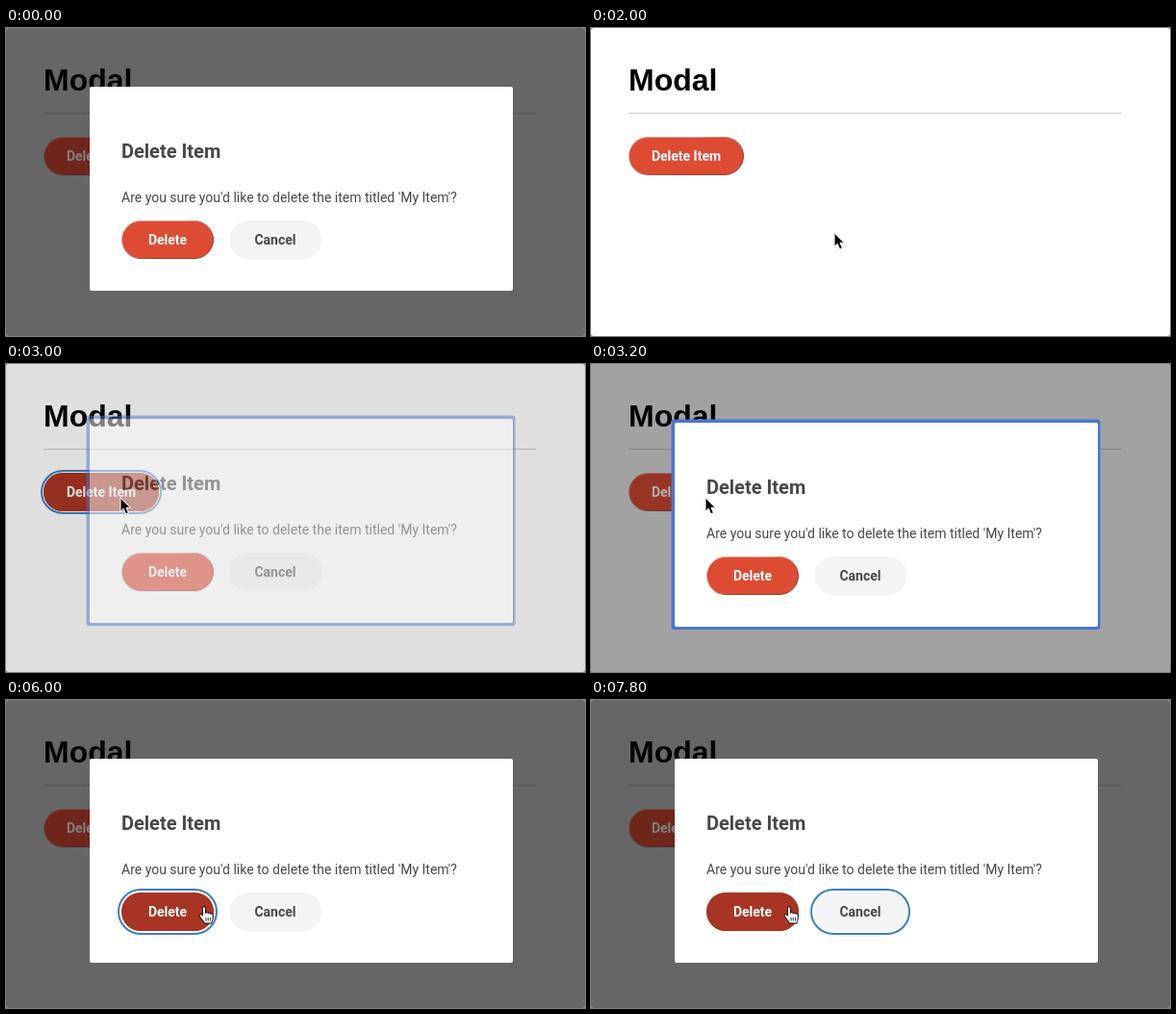
Write an HTML page that moves like this. It is 602 px wide and 320 px high and loops after 8000 ms.

```html
<!DOCTYPE html>
<html lang="en">
<head>
<meta charset="utf-8">
<title>Modal</title>
<style>
html, body { margin: 0; width: 602px; height: 320px; overflow: hidden; background: #888; }
svg { display: block; background: #fff; border-radius: 3px; }
text { font-family: Roboto, sans-serif; font-size: 14px; fill: #474747; }
.heading { font: bold 32px "Liberation Sans", Arial, sans-serif; fill: #000; }
.title { font-size: 20px; font-weight: 700; }
.label { font-weight: 700; text-anchor: middle; }
.light { fill: #fff; }
.red { fill: #dd4b33; stroke: url(#edge); }
.dark { fill: #a83423; }
.ring { fill: #fff; stroke: #3d7fc4; stroke-width: 2; }
#panel { fill: #fff; }
#panelRing { fill: #4a76cc; filter: blur(.4px); }

/* Hard switches */
.flip { animation: 8s step-end infinite; }
#itemRing { animation-name: itemRing; }
#itemHover { animation-name: itemHover; }
#panelRing { animation-name: panelRing; }
#deleteRing { animation-name: deleteRing; }
#deleteHover { animation-name: deleteHover; }
#cancelRing { animation-name: cancelRing; }
#cancelHover { animation-name: cancelHover; }
#press { animation-name: press; }
#hand { animation-name: hand; }
#arrow { animation-name: arrow; }
#pointer { animation-name: pointer; }

/* Smooth motion */
#shade { animation: shade 8s linear infinite; }
#item { animation: dim 8s linear infinite; }
#modal { animation: modal 8s linear infinite; }
#cursor { animation: travel 8s ease-in-out infinite; }

@keyframes itemRing { 0%, 20%, 40% { opacity: 0 } 16.25%, 33.75% { opacity: 1 } 100% { opacity: 0 } }
@keyframes itemHover { 0%, 38.75%, 100% { opacity: 0 } 29.2% { opacity: 1 } }
@keyframes panelRing { 0%, 65%, 100% { opacity: 0 } 35% { opacity: 1 } }
@keyframes deleteRing { 0%, 86.25%, 100% { opacity: 0 } 65% { opacity: 1 } }
@keyframes deleteHover { 0% { opacity: 0 } 65%, 100% { opacity: 1 } }
@keyframes cancelRing { 0%, 16.25% { opacity: 0 } 12.5%, 86.25%, 100% { opacity: 1 } }
@keyframes cancelHover { 0%, 16.25%, 100% { opacity: 0 } 8.75% { opacity: 1 } }
@keyframes press { 0%, 15%, 21.25%, 35%, 100% { opacity: 0 } 12.5%, 18.75%, 33.75% { opacity: 1 } }
@keyframes hand { 0%, 16.25%, 37%, 100% { opacity: 0 } 8.75%, 29.2%, 65% { opacity: 1 } }
@keyframes arrow { 0%, 16.25%, 37%, 100% { opacity: 1 } 8.75%, 29.2%, 65% { opacity: 0 } }
@keyframes pointer { 0% { opacity: 0 } 2.5%, 100% { opacity: 1 } }

@keyframes shade {
  0%, 14% { opacity: .6 }
  16.25%, 35% { opacity: 0 }
  37.5% { opacity: .125 }
  42.5%, 100% { opacity: .6 }
}
@keyframes dim {
  0%, 14% { filter: brightness(.5) }
  16.25%, 35% { filter: brightness(1) }
  37.5% { filter: brightness(.88) }
  42.5%, 100% { filter: brightness(.5) }
}
@keyframes modal {
  0%, 14% { opacity: 1; transform: none }
  16.25% { opacity: 0; transform: translateY(-8px) }
  35% { opacity: 0; transform: translateY(-8px) }
  37.5% { opacity: 1; opacity: .5; transform: translateY(-4px) }
  40%, 100% { opacity: 1; transform: none }
}
@keyframes travel {
  0%, 2.5% { transform: translate(345px, 266px) }
  10%, 23.75% { transform: translate(276px, 223px) }
  25% { transform: translate(253px, 213px) }
  31.25%, 48.75% { transform: translate(119px, 139px) }
  56.25%, 60% { transform: translate(173px, 57px) }
  67.5%, 100% { transform: translate(206px, 215px) }
}
</style>
</head>
<body>
<svg width="602" height="320" viewBox="0 0 602 320">
  <defs>
    <linearGradient id="edge" x2="1" y2="1">
      <stop offset=".3" stop-color="#e4a094"/>
      <stop offset=".7" stop-color="#85443a"/>
    </linearGradient>
  </defs>

  <text class="heading" x="39" y="65">Modal</text>
  <rect x="39" y="88" width="512" height="1" fill="#ccc"/>
  <rect id="shade" width="602" height="320"/>

  <g id="item">
    <rect id="itemRing" class="ring flip" x="37" y="111" width="124" height="44" rx="22"/>
    <rect class="red" x="39.5" y="113.5" width="119" height="39" rx="19.5"/>
    <rect id="itemHover" class="dark flip" x="39" y="113" width="120" height="40" rx="20"/>
    <text class="label light" x="99" y="138">Delete Item</text>
  </g>

  <g id="modal">
    <rect id="panelRing" class="flip" x="83.5" y="57.5" width="446" height="218.5" rx="3"/>
    <rect id="panel" x="87" y="61" width="440" height="212" rx="2"/>
    <text class="title" x="120" y="135">Delete Item</text>
    <text x="120" y="181">Are you sure you'd like to delete the item titled 'My Item'?</text>

    <rect id="deleteRing" class="ring flip" x="117" y="197" width="102" height="46" rx="23"/>
    <rect class="red" x="120.5" y="200.5" width="95" height="39" rx="19.5"/>
    <rect id="deleteHover" class="dark flip" x="120" y="200" width="96" height="40" rx="20"/>
    <text class="label light" x="168" y="225">Delete</text>

    <rect id="cancelRing" class="ring flip" x="229" y="197" width="102" height="46" rx="23"/>
    <rect x="232.5" y="200" width="96" height="40" rx="20" fill="#f3f4f6"/>
    <rect id="cancelHover" class="flip" x="232.5" y="200" width="96" height="40" rx="20" fill="#d7d8db"/>
    <text class="label" x="280" y="225">Cancel</text>
  </g>

  <g id="cursor">
    <g id="pointer" class="flip">
      <circle id="press" class="flip" cx="-1" r="29" fill="none" stroke="#000" stroke-width="3"/>
      <path id="arrow" class="flip" d="M0 0V14.2L3.2 11.2 5.6 16.8 8.4 15.6 6 10.2H10.4Z" stroke="#fff"/>
      <g id="hand" class="flip" stroke="#000" stroke-linejoin="round">
        <path fill="#fff" d="M-1.6 9V1.2a1.5 1.5 0 0 1 3 0V6.5c.3-1.3 2.6-1.2 2.8.3.5-1 2.6-.8 2.7.6.6-.8 2.3-.4 2.3 1V12c0 2-1.2 2.8-1.2 5H.2C0 15-3 12.5-4.6 9.8c-1-1.8 1-2.8 2-1.5z"/>
        <path stroke-width=".8" d="M2 11v3.5M4.2 11v3.5M6.4 11v3.5"/>
      </g>
    </g>
  </g>
</svg>
</body>
</html>
```
